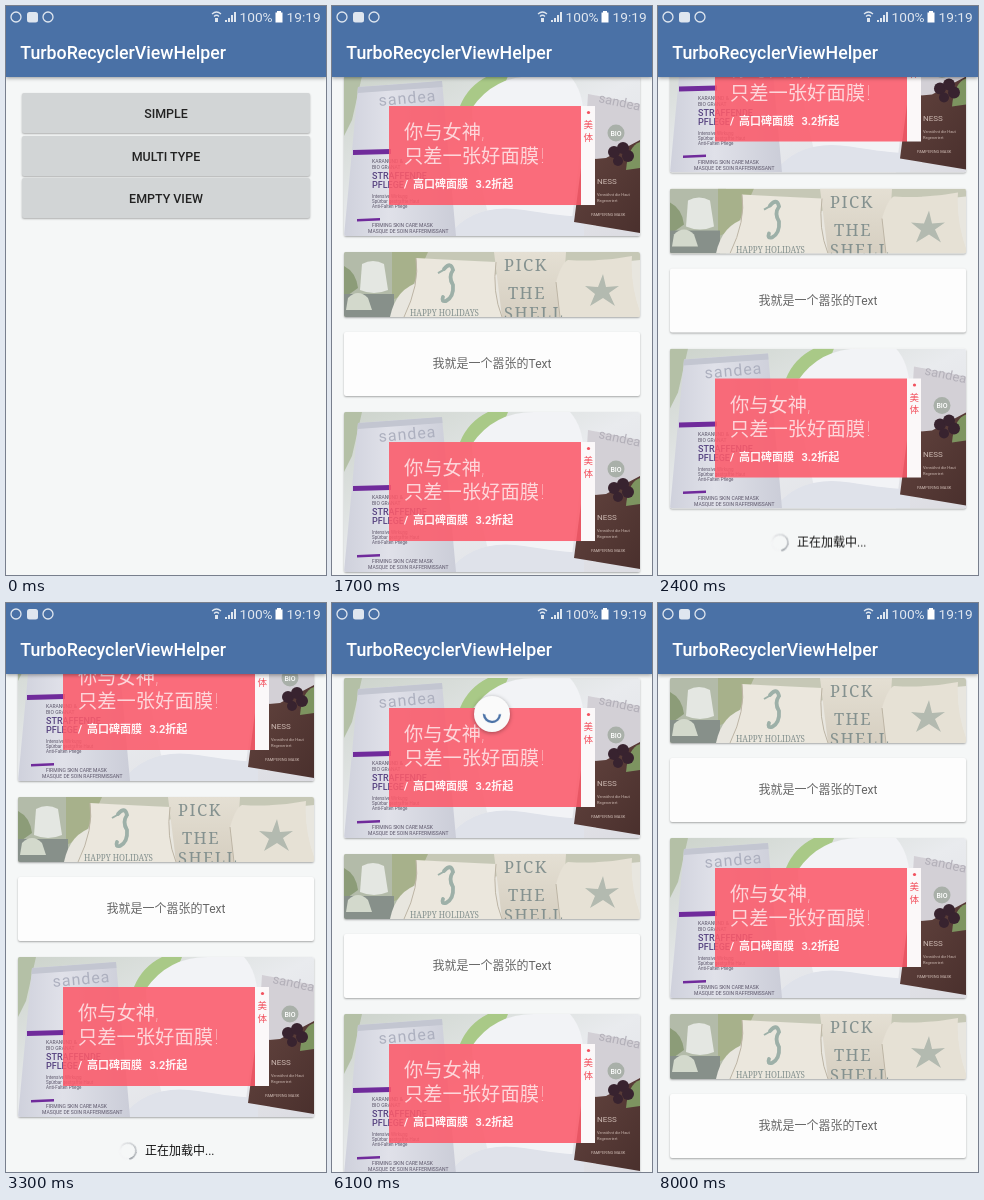
Write an HTML page that moves like this. It is 320 by 569 pixels and loops after 8100 ms.

```html
<!DOCTYPE html>
<html lang="zh-CN">
<head>
<meta charset="utf-8">
<title>TurboRecyclerViewHelper</title>
<style>
  html, body { margin: 0; width: 100%; height: 100%; overflow: hidden; background: #f5f7f7; }
  body { position: relative; font-family: Roboto, "Noto Sans CJK SC", "Noto Sans CJK", sans-serif; }
  svg { display: block; overflow: hidden; }
  .stage { position: absolute; left: 0; top: 0; width: 320px; height: 569px; overflow: hidden; background: #f5f7f7; }
  .page, .list, .more { position: absolute; left: 0; top: 0; width: 320px; }
  .page { height: 569px; background: #f5f7f7; }

  .bar { position: absolute; left: 0; top: 0; width: 320px; height: 71px; background: #4a71a6;
    box-shadow: 0 1px 4px rgba(0, 0, 0, .4); }
  .bar svg { position: absolute; left: 0; top: 0; }
  .bar h1 { position: absolute; left: 14.2px; top: 36px; margin: 0; font: 500 17.78px/22px Roboto, sans-serif;
    color: #fff; white-space: nowrap; }

  .btn { position: absolute; left: 16px; width: 288px; height: 40px; border-radius: 2px; background: #d2d5d6;
    box-shadow: 0 1px 2px rgba(0, 0, 0, .3); font: 500 12.44px/41px Roboto, sans-serif; color: #222;
    text-align: center; }
  .tap { animation: tap 8.1s linear infinite; }

  .card { position: absolute; left: 12px; width: 296px; border-radius: 2px; overflow: hidden; background: #fdfdfd;
    box-shadow: 0 1px 2px rgba(0, 0, 0, .32); }
  .mask { height: 160px; }
  .sofa { height: 65px; }
  .note { height: 64px; font-size: 12px; line-height: 64px; text-align: center; color: #666; }

  .footer { position: absolute; left: 0; top: 845px; width: 320px; height: 42px; animation: footer 8.1s linear infinite; }
  .footer span { position: absolute; left: 139px; top: 0; font-size: 12px; line-height: 42px; color: #111; white-space: nowrap; }
  .ring { position: absolute; left: 113px; top: 12px; width: 18px; height: 18px; border-radius: 50%;
    background: conic-gradient(from -70deg, #f3f4f5 30%, #9a9fa5);
    mask: radial-gradient(circle, transparent 6.8px, #000 7.5px);
    animation: spin .9s linear infinite; }

  .puck { position: absolute; left: 142px; top: 0; width: 36px; height: 36px; border-radius: 50%; background: #fafafa;
    box-shadow: 0 1px 4px rgba(0, 0, 0, .35); animation: puck 8.1s linear infinite; }
  .puck svg { animation: turn 1.3s linear infinite; }
  .puck circle { fill: none; stroke: #4a71a6; stroke-width: 2.3; animation: dash 1.3s linear infinite; }

  .window { animation: open 8.1s linear infinite; }
  .list { top: 75px; animation: scroll 8.1s linear infinite; }
  .more { animation: more 8.1s linear infinite; }

  /* 100 ms = 1.2346% */
  @keyframes tap { 0% { background: #d2d5d6 } 1.23%, 6.2% { background: #b9bdbf } 7%, 100% { background: #d2d5d6 } }
  @keyframes open {
    0%, 1.24% { opacity: 0; transform: translateY(46px) }
    3.7% { opacity: .85; transform: translateY(14px) }
    4.94% { opacity: 1; transform: translateY(4px) }
    6.17%, 100% { opacity: 1; transform: none }
  }
  @keyframes scroll {
    0%, 13.58% { transform: none }
    14.815% { transform: translateY(-22px) }
    16.05% { transform: translateY(-85px) }
    18.519% { transform: translateY(-225px) }
    20.988% { transform: translateY(-341px) }
    23.457% { transform: translateY(-446px) }
    24.691% { transform: translateY(-477px) }
    25.926% { transform: translateY(-482px); animation-timing-function: ease-in-out }
    30.864%, 58.025% { transform: translateY(-393px) }
    59.259% { transform: translateY(-401px) }
    61.728% { transform: translateY(-500px) }
    62.963%, 64.198% { transform: translateY(-535px); animation-timing-function: ease-in-out }
    70.37%, 91.358% { transform: none }
    92.593% { transform: translateY(-10px) }
    95.062% { transform: translateY(-95px) }
    97.531% { transform: translateY(-164px) }
    98.765%, 100% { transform: translateY(-176px) }
  }
  @keyframes footer { 0%, 46.92% { opacity: 1 } 48.14%, 100% { opacity: 0 } }
  @keyframes more { 0%, 46.92% { opacity: 0 } 48.14% { opacity: .5 } 49.38%, 100% { opacity: 1 } }
  @keyframes puck {
    0%, 69.13% { transform: translateY(30px) }
    72.84% { transform: translateY(116px) }
    74.074%, 87.65% { transform: translateY(93px) scale(1) }
    90.12%, 100% { transform: translateY(93px) scale(0) }
  }
  @keyframes spin { to { transform: rotate(360deg) } }
  @keyframes turn { from { transform: rotate(20deg) } to { transform: rotate(380deg) } }
  @keyframes dash {
    0% { stroke-dasharray: 8 92; stroke-dashoffset: 0 }
    50% { stroke-dasharray: 75 25; stroke-dashoffset: 0 }
    100% { stroke-dasharray: 8 92; stroke-dashoffset: -67 }
  }
</style>
</head>
<body>
<svg width="0" height="0" style="position:absolute">
  <defs>
    <linearGradient id="cloth" x2="1" y2="1">
      <stop offset="0" stop-color="#ccd3cb"/><stop offset=".5" stop-color="#e9ebee"/><stop offset="1" stop-color="#dcdce2"/>
    </linearGradient>
    <linearGradient id="pouch" x2="1">
      <stop offset="0" stop-color="#cfd1dc"/><stop offset=".4" stop-color="#e0e1e9"/><stop offset="1" stop-color="#cbcdd8"/>
    </linearGradient>
    <linearGradient id="brown" x2="1" y2="1">
      <stop offset="0" stop-color="#63443f"/><stop offset="1" stop-color="#4a302d"/>
    </linearGradient>
    <linearGradient id="linen" x2="0" y2="1">
      <stop offset="0" stop-color="#e4dfd3"/><stop offset="1" stop-color="#d6cfc1"/>
    </linearGradient>

    <symbol id="mask" viewBox="0 0 296 160">
      <rect width="296" height="160" fill="url(#cloth)"/>
      <path d="M0 0H18L8 44L0 60Z" fill="#b4c0a6"/>
      <path d="M116 30Q124 10 144 0H164Q158 18 136 30Z" fill="#a9c987"/>
      <path d="M128 32Q150 0 190 0H226Q244 20 238 60L226 160H150Q130 90 128 32Z" fill="#f2f3f6"/>
      <path d="M104 160Q130 126 180 134T240 140V160Z" fill="#dfe2ea"/>

      <path d="M14 11L98 5L112 160H0Z" fill="url(#pouch)"/>
      <path d="M14 11L98 5L98.500 11L13.500 17Z" fill="#c3c6d1"/>
      <text transform="translate(35 30) rotate(-5)" font-size="16" letter-spacing="1" fill="#adb0bf">sandea</text>
      <path d="M9 74L47 73V78L9 79Z" fill="#702b9b"/>
      <path d="M13 143L36 142V144.500L13 145.500Z" fill="#702b9b"/>
      <g fill="#5b5569" font-size="5">
        <text x="28" y="87">KARANUND &amp;</text><text x="28" y="93">BIO GRANAT</text>
        <g font-size="9" font-weight="500" fill="#574380"><text x="28" y="103">STRAFFENDE</text><text x="28" y="112">PFLEGE</text></g>
        <g font-size="4.500"><text x="28" y="122">Intensive Wirkung</text><text x="28" y="127">Spürbar gestraffte Haut</text><text x="28" y="132">Anti-Falten Pflege</text></g>
        <text x="28" y="151">FIRMING SKIN CARE MASK</text><text x="24" y="157">MASQUE DE SOIN RAFFERMISSANT</text>
      </g>

      <path d="M244 18L296 28V110H238Z" fill="#d3d0d6"/>
      <text transform="translate(254 26) rotate(12)" font-size="13" fill="#b3b0b9">sandea</text>
      <path d="M238 84L262 82L296 64V157L230 146Z" fill="url(#brown)"/>
      <path d="M282 94Q284 70 296 66V92Z" fill="#7d9460"/>
      <g fill="#38232f"><circle cx="270" cy="76" r="6"/><circle cx="279" cy="72" r="6"/><circle cx="284" cy="80" r="6"/><circle cx="274" cy="85" r="5"/></g>
      <circle cx="272" cy="57" r="8.500" fill="#a9b0a9"/>
      <text x="272" y="59.500" font-size="7" font-weight="500" text-anchor="middle" fill="#fff">BIO</text>
      <g fill="#cdbab3" font-size="4"><text x="253" y="108" font-size="8">NESS</text>
        <text x="253" y="120">Verwöhnt die Haut</text><text x="253" y="126">Regeneriert</text>
        <text x="247" y="140">PAMPERING MASK</text></g>

      <rect x="45" y="30" width="192" height="99" fill="#fc5b6a" fill-opacity=".88"/>
      <rect x="237" y="30" width="14" height="99" fill="#fbf8f9"/>
      <g fill="#f2525f" font-size="9.500" text-anchor="middle"><circle cx="244.500" cy="36.500" r="1.600"/>
        <text x="244.300" y="52">美</text><text x="244.300" y="64.500">体</text></g>
      <g fill="#fff">
        <g font-size="19.300" font-weight="100" fill-opacity=".72"><text x="60" y="63">你与女神,</text><text x="60" y="87">只差一张好面膜<tspan dx="1.500">!</tspan></text></g>
        <g font-size="11" font-weight="700" fill-opacity=".92"><text x="60" y="112">/</text><text x="69" y="112">高口碑面膜</text><text x="131.500" y="112">3.2折起</text></g>
      </g>
    </symbol>

    <symbol id="sofa" viewBox="0 0 296 65">
      <rect width="296" height="65" fill="#c6c8b6"/>
      <path d="M0 0H56V65H0Z" fill="#b3bba9"/>
      <path d="M48 0H84L66 40L48 48Z" fill="#a7b18b"/>
      <path d="M18 12Q29 6 40 12L44 38Q30 44 16 38Z" fill="#e4e7e2"/>
      <path d="M0 14Q12 20 14 36L0 46Z" fill="#8c9c78"/>
      <rect y="42" width="50" height="23" fill="#87908a"/>
      <path d="M4 46Q14 36 24 46L28 58H2Z" fill="#d3d9cc"/>
      <path d="M46 65Q52 36 76 30L296 8V65Z" fill="#e8e6df"/>
      <path d="M150 0H222L218 65H158Z" fill="url(#linen)"/>
      <path d="M72 6Q108 8 152 10Q148 40 158 65H60Q76 32 72 6Z" fill="#ebe7dd"/>
      <path d="M212 30Q218 10 224 8Q258 10 288 4Q286 32 296 60V65H216Z" fill="#e6e1d5"/>
      <path d="M72 6Q76 32 60 65M152 10Q148 40 158 65M216 65L212 30" fill="none" stroke="#bdb5a5"/>
      <path d="M100 17Q107 9 109 18Q104 25 109 33Q110 45 102 49Q97 50 99 45" fill="none" stroke="#9db0a8" stroke-width="3.800" stroke-linecap="round"/>
      <path d="M101 17L94 21" stroke="#9db0a8" stroke-width="2"/>
      <path d="M259 22L262 35L275 34L265 41L271 54L259 46L246 54L251 42L241 34L254 35Z" fill="#b3bab0"/>
      <g fill="#84918f" font-family="'Noto Serif', serif">
        <g font-size="16.500" letter-spacing="1.500"><text x="160" y="19">PICK</text><text x="164" y="47">THE</text><text x="160" y="67">SHELL</text></g>
        <text x="66" y="64" font-size="8">HAPPY HOLIDAYS</text>
      </g>
    </symbol>
  </defs>
</svg>

<div class="stage">
  <div class="page">
    <div class="btn tap" style="top:87px">SIMPLE</div>
    <div class="btn" style="top:130px">MULTI TYPE</div>
    <div class="btn" style="top:172px">EMPTY VIEW</div>
  </div>
  <div class="page window">
    <div class="list">
      <div class="first"></div>
      <div class="more"></div>
      <div class="footer"><i class="ring"></i><span>正在加载中...</span></div>
    </div>
    <div class="puck">
      <svg width="36" height="36"><circle cx="18" cy="18" r="8" pathLength="100"/></svg>
    </div>
  </div>
  <div class="bar">
    <svg width="320" height="22" fill="#dfe6ef">
      <g fill="none" stroke="#dfe6ef" stroke-width="1.300"><circle cx="10" cy="11" r="5"/><circle cx="42" cy="11" r="5"/></g>
      <rect x="21" y="6" width="11" height="10.500" rx="2.500"/>
      <g fill="none" stroke="#dfe6ef" stroke-width="1.200"><path d="M206 8Q210.500 4 215 8M208 10.500Q210.500 8 213 10.500"/></g>
      <path d="M209 12H212V16H209ZM219 14H221V16H219ZM222 12H224V16H222ZM225 9H227V16H225ZM228 6H230V16H228Z"/>
      <path d="M271 5H275V6.500H276.500V16.500H269.500V6.500H271Z" fill="#fff"/>
      <g font-family="Roboto, sans-serif" font-size="13.700"><text x="233.500" y="16">100%</text><text x="280.500" y="16">19:19</text></g>
    </svg>
    <h1>TurboRecyclerViewHelper</h1>
  </div>
</div>

<script>
  const LOOP = 8100, STEP = 100, PERIOD = 336, LOADED = 7, TOTAL = 12;
  const photo = (id, h) => `<svg width="296" height="${h}"><use href="#${id}" width="296" height="${h}"/></svg>`;
  const kinds = [
    { name: 'mask', y: 0, body: photo('mask', 160) },
    { name: 'sofa', y: 176, body: photo('sofa', 65) },
    { name: 'note', y: 256, body: '我就是一个嚣张的Text' }
  ];
  const card = i => {
    const { name, y, body } = kinds[i % 3];
    return `<div class="card ${name}" style="top:${Math.floor(i / 3) * PERIOD + y}px">${body}</div>`;
  };
  const cards = Array.from({ length: TOTAL }, (_, i) => card(i));
  document.querySelector('.first').innerHTML = cards.slice(0, LOADED).join('');
  document.querySelector('.more').innerHTML = cards.slice(LOADED).join('');

  // One clock drives every keyframe animation in 100 ms steps.
  const anims = document.getAnimations();
  anims.forEach(a => a.pause());
  const start = performance.now();
  function tick() {
    const t = (performance.now() - start + 5) % LOOP;
    const held = Math.floor(t / STEP) * STEP;
    anims.forEach(a => { a.currentTime = held; });
    requestAnimationFrame(tick);
  }
  tick();
</script>
</body>
</html>
```
